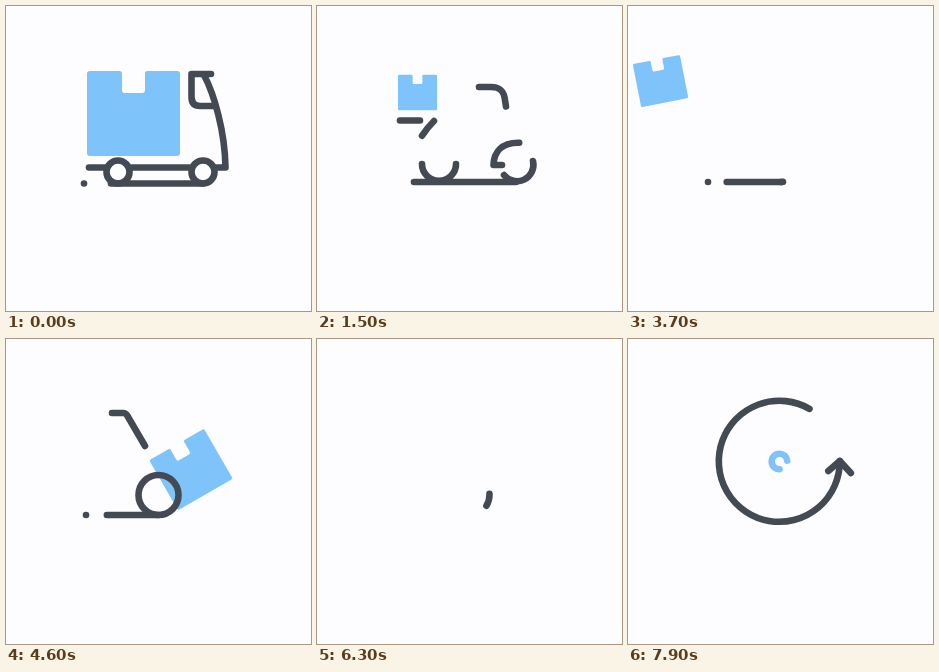
An HTML page for the animation above (8000 ms loop, 305 by 305 pixels).

```html
<!DOCTYPE html>
<html lang="en">
<head>
<meta charset="utf-8">
<title>Delivery icons</title>
<style>
  html, body { margin: 0; width: 100%; height: 100%; overflow: hidden; background: #fdfcff; }
  svg { display: block; width: 100vw; height: 100vh; }
  path { fill: none; stroke: #444a54; stroke-width: 6.6; stroke-linecap: round; stroke-linejoin: round; }
  .blue { stroke: #7ec4fb; }
  #box { fill: #7ec4fb; stroke: none; }
</style>
</head>
<body>
<svg id="stage" viewBox="0 0 305 305">
  <path id="box" d="M-43.5 -42.5H-14Q-11.500 -42.500 -11.500 -40V-23.500Q-11.500 -20.500 -8.500 -20.500H8.500Q11.500 -20.500 11.500 -23.500V-40Q11.500 -42.500 14 -42.500H43.500Q46.500 -42.500 46.500 -39.500V39.500Q46.500 42.500 43.500 42.500H-43.500Q-46.500 42.500 -46.500 39.500V-39.500Q-46.500 -42.500 -43.500 -42.500Z"/>
</svg>
<script>
const LOOP = 8000;
const stage = document.getElementById('stage');
const box = document.getElementById('box');
const smooth = p => p * p * (3 - 2 * p);
const clamp = p => Math.min(1, Math.max(0, p));
const mix = (a, b, p) => a + (b - a) * p;

// Value at time t from a flat list of time, value pairs.
function track(t, keys, ease = smooth) {
  if (t <= keys[0]) return keys[1];
  for (let i = 2; i < keys.length; i += 2) {
    if (t < keys[i]) {
      const p = (t - keys[i - 2]) / (keys[i] - keys[i - 2]);
      return mix(keys[i - 1], keys[i + 1], ease(p));
    }
  }
  return keys[keys.length - 1];
}
const linear = p => p;
const show = (el, on) => el.style.visibility = on ? 'visible' : 'hidden';

function addPath(d, cls = '') {
  const el = document.createElementNS('http://www.w3.org/2000/svg', 'path');
  el.setAttribute('d', d);
  el.setAttribute('class', cls);
  stage.append(el);
  return el;
}

// A line that is drawn by its head and erased by its tail.
const strokes = [];
function stroke(d, head, tail, cls) {
  const el = addPath(d, cls);
  el.setAttribute('pathLength', 1);
  strokes.push({ el, head, tail });
}
const ring = (x, y, r) => `M${x} ${y + r}a${r} ${r} 0 0 0 0 ${-2 * r}a${r} ${r} 0 0 0 0 ${2 * r}`;

// Truck
const truck = (d, out) => stroke(d, [0, 1], [out, 0, out + 450, 1]);
truck('M205 68H185.500V91Q185.500 100 194 100H208', 250);
truck('M198 69C208 88 219 125 219.500 161.500H211', 350);
truck('M83 161.500H99', 300);
truck('M126 161.500H183', 400);
truck(ring(112, 166, 11.5), 450);
truck(ring(197, 166, 11.5), 500);

// Scooter
const scooter = (d, start, time, out) =>
  stroke(d, [start, 0, start + time, 1], [out, 0, out + 350, 1]);
scooter('M105 158A17 16.800 0 0 0 139 158', 1000, 400, 2850);
scooter('M187 169A16.500 16.500 0 0 0 216 155', 1000, 400, 3250);
scooter('M162 81H174C184 81 187 86 188 94L193 126', 1215, 500, 3200);
scooter('M185 159H176.500C177 144 187 133 213 138C206 150 199 159 185 159', 1252, 500, 3250);
scooter('M83 114.500H147', 1315, 500, 3200);
scooter('M117 115C104 128 96 143 96 158.500H176', 1308, 800, 3250);
scooter('M127 101H142Q149 101 149 108V157', 1800, 400, 3200);
scooter('M176 83V157', 1850, 400, 3200);

// Hand truck
stroke('M106 74H117Q120 74 121.500 77L139 107', [3800, 0, 4250, 1], [5600, 0, 6000, 1]);
stroke(ring(152.5, 156, 20), [3650, 0, 4250, 1, 5700, 1, 6300, .26, 6400, .2],
  [5850, 0, 6300, .16, 6400, .2]);

// Clock
stroke(ring(151.5, 122.5, 7.8), [6500, 0, 6850, 1], [7550, 0, 7900, .27, 8100, .5], 'blue');
for (const a of [79, 176]) {
  const [x, y] = polar(a, 11), [u, v] = polar(a, 33);
  stroke(`M${x} ${y}L${u} ${v}`, [6650, 0, 7000, 1, 7350, 1, 7750, 0], [0, 0], 'blue');
}

const ground = addPath('');
const dot = addPath('');
const arc = addPath('');
const arrow = addPath('');

function polar(deg, r) {
  const a = deg * Math.PI / 180;
  return [151.3 + r * Math.cos(a), 122.3 - r * Math.sin(a)];
}

function drawBox(t) {
  let x, y, size, turn;
  if (t < 3350) {
    const p = smooth(clamp((t - 900) / 550));
    const lift = Math.sin(p * Math.PI);
    x = mix(127.5, 100.5, p) - 15 * lift;
    y = mix(107.5, 86.5, p) - 14 * lift;
    size = mix(1, .42, p);
    turn = -8 * lift;
  } else {
    const p = smooth(clamp((t - 3350) / 850)), q = 1 - p;
    const gone = clamp((t - 5600) / 550);
    x = 100.5 * q * q - 140 * p * q + 185 * p * p + 60 * gone;
    y = 86.5 * q * q + 98 * p * q + 130.5 * p * p - 16 * gone;
    size = mix(.42, .68, p) * (1 - gone * gone);
    turn = -30 * p + 30 * gone;
  }
  box.setAttribute('transform', `translate(${x} ${y}) rotate(${turn}) scale(${size})`);
  show(box, size > .01);
}

function drawGround(t) {
  const y = track(t, [500, 177.5, 1000, 176]);
  const sway = -3 * Math.cos((t - 1500) / 425 * 2 * Math.PI);
  const base = track(t, [300, 102, 1000, 100]) + sway;
  const left = mix(base, 152.5, smooth(clamp((t - 5600) / 400)));
  const right = track(t, [500, 197, 1000, 199, 3300, 199, 3750, 152.5]);
  ground.setAttribute('d', `M${left} ${y}H${right}`);
  show(ground, t < 6000);

  const scale = track(t, [600, 1, 850, 0, 1550, 0, 1780, 1, 5600, 1, 5850, 0]);
  const x = track(t, [1000, 78, 1500, 80]);
  dot.setAttribute('d', `M${x} ${y}h.01`);
  dot.style.strokeWidth = 6.6 * scale;
  show(dot, scale > .01);
}

function drawArrow(t) {
  const head = track(t, [6400, 0, 7100, 163, 7900, 360, 8000, 384], linear);
  const tail = track(t, [6400, 0, 7100, 25, 7900, 60, 8000, 66], linear);
  const [x, y] = polar(tail, 60.5), [u, v] = polar(head, 60.5);
  arc.setAttribute('d', `M${x} ${y}A60.500 60.500 0 ${head - tail > 180 ? 1 : 0} 0 ${u} ${v}`);
  const k = track(t, [6450, 0, 6750, 1]);
  arrow.setAttribute('d', `M${-11.5 * k} ${10 * k}L0 0L${11 * k} ${12 * k}`);
  arrow.setAttribute('transform', `translate(${u} ${v}) rotate(${-head})`);
  show(arc, t > 6400);
  show(arrow, t > 6400);
}

function draw(t) {
  for (const { el, head, tail } of strokes) {
    const a = track(t, tail), b = track(t, head);
    el.style.strokeDasharray = `${Math.max(0, b - a)} 2`;
    el.style.strokeDashoffset = -a;
    show(el, b - a > .002);
  }
  drawBox(t);
  drawGround(t);
  drawArrow(t);
}

const begin = performance.now();
function tick() {
  draw((performance.now() - begin) % LOOP);
  requestAnimationFrame(tick);
}
tick();
</script>
</body>
</html>
```
